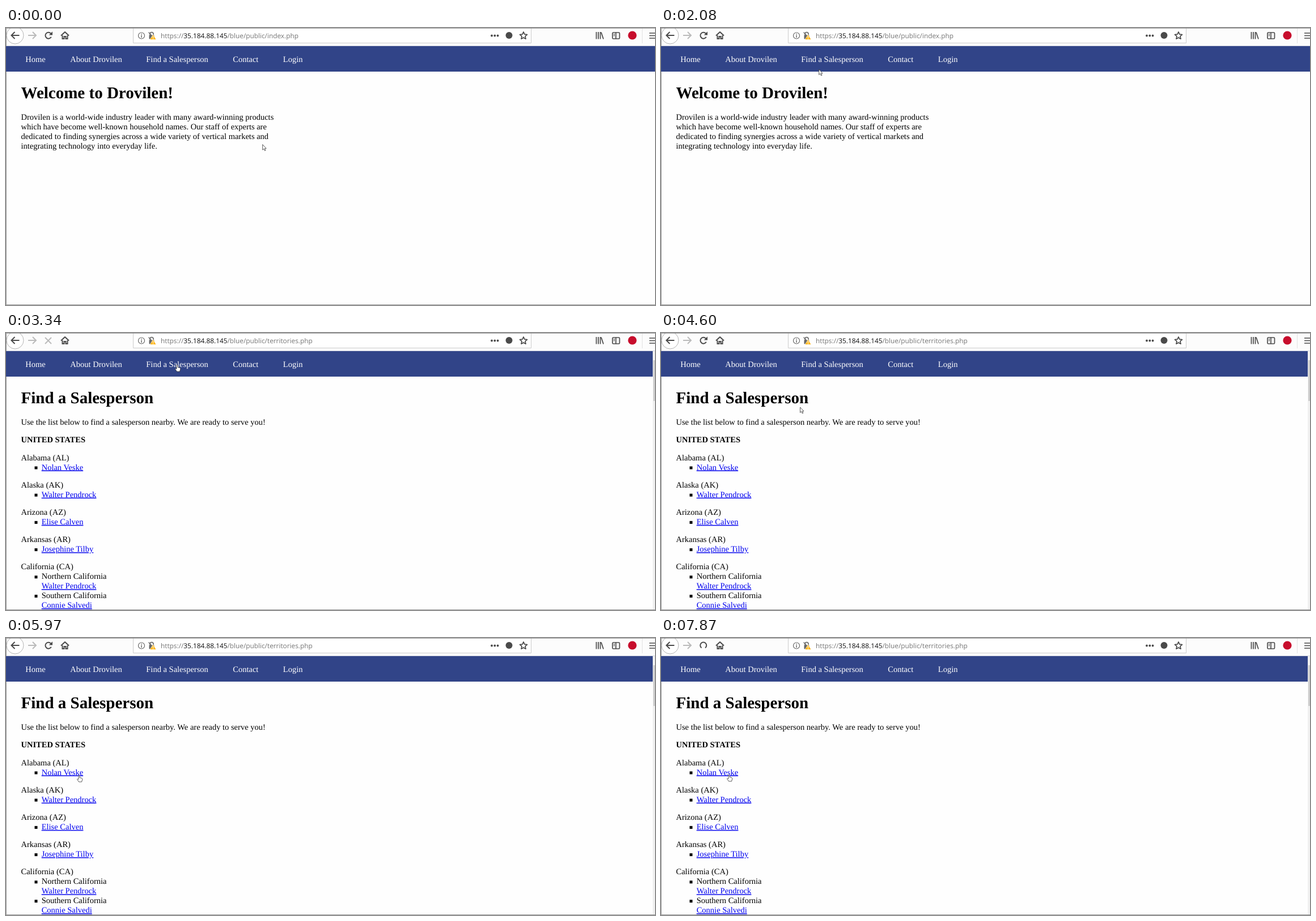
Recreate the animation shown at these times as an HTML page. Size 1145 by 489 pixels, loop 7.99 s.

```html
<!DOCTYPE html>
<html lang="en">
<head>
<meta charset="utf-8">
<title>Find a Salesperson</title>
<style>
html, body { margin: 0; height: 100%; overflow: hidden; background: #fefefe; }
svg { display: block; width: 1145px; height: 489px; }
text { font: 14.5px "Liberation Serif", "Times New Roman", serif; text-rendering: geometricPrecision; }
.h1 { font-size: 29px; font-weight: bold; }
.b { font-weight: bold; }
.link { fill: #00e; text-decoration: underline 1px; }
.nav { fill: #fff; }
.url { font: 11.83px "Open Sans", "Noto Sans", sans-serif; fill: #767676; }
.line { fill: none; stroke: #4a4a4a; stroke-width: 2; }
.thin { stroke-width: 1.7; }
.dark { fill: #4a4a4a; }
</style>
</head>
<body>
<svg viewBox="0 0 1145 489">
  <rect width="1145" height="31" fill="#fcfcfc"/>
  <path d="M0 31.5H1145" stroke="#d4d7e2"/>

  <!-- toolbar -->
  <circle cx="16" cy="13" r="15" fill="#fff" stroke="#b4b4b4"/>
  <path class="line" d="M9.5 13H23.5M15.5 7L9.5 13L15.5 19"/>
  <path class="line" style="stroke:#bbb" d="M39 13H53M47 7L53 13L47 19"/>
  <g id="stop" class="line" style="stroke:#bbb"><path d="M-5.5 -5.5L5.5 5.5M5.5 -5.5L-5.5 5.5"/></g>
  <path id="arc" class="line" pathLength="1"/>
  <path id="head" d="M82 6.2V12.6H75.8Z"/>
  <path class="line" d="M97 13.5L104 7L111 13.5" stroke-linejoin="round"/>
  <path class="line" d="M99.5 13V19H102.5V15H105.5V19H108.5V13"/>

  <!-- address field -->
  <path d="M224.5 0V26.5H926.5V0" fill="#fff" stroke="#ccc"/>
  <circle cx="239" cy="13.5" r="5.5" fill="none" stroke="#666" stroke-width="1.2"/>
  <path d="M239 10V11.4M239 12.6V17" stroke="#666" stroke-width="1.4"/>
  <path d="M254 13V10.5A3 3 0 0 1 260 10.5V13" fill="none" stroke="#666" stroke-width="1.7"/>
  <rect x="252.5" y="12.5" width="9" height="7" rx="1" fill="#666"/>
  <path d="M251.5 7.5L261 18" stroke="#666" stroke-width="1.2"/>
  <path d="M259.5 11.5L265 20.5H254Z" fill="#fdb515" stroke="#fff" stroke-width=".7"/>
  <path d="M259.5 14.5V17.5M259.5 18.3V19.5" stroke="#fff" stroke-width="1.2"/>
  <text class="url" x="273" y="18">https://<tspan fill="#0c0c0d">35.184.88.145</tspan><tspan id="path"></tspan></text>
  <g class="dark">
    <circle cx="857" cy="13.5" r="1.9"/><circle cx="862.3" cy="13.5" r="1.9"/><circle cx="867.6" cy="13.5" r="1.9"/>
    <circle cx="887.5" cy="13" r="6"/>
  </g>
  <path id="star" class="line thin" stroke-linejoin="round"/>

  <!-- right-hand buttons -->
  <path class="line thin" d="M1041.5 7V19.5M1045 7V19.5M1048.5 7V19.5M1050 7.5L1054 19.5"/>
  <rect class="line thin" x="1070" y="8" width="12.5" height="11" rx="1.5"/>
  <path class="line thin" d="M1076 8V19M1072 11H1074M1072 13.5H1074"/>
  <circle cx="1105" cy="13" r="7.6" fill="#c70d2c"/>
  <path d="M1122.5 1V27" stroke="#e2e2e2"/>
  <path class="line thin" d="M1135 9H1145M1135 13.5H1145M1135 18H1145"/>

  <!-- site -->
  <path d="M.5 0V489M0 488.5H1145M0 .5H1145" fill="none" stroke="#999"/>
  <rect id="bar" y="32" height="45" fill="#314488"/>
  <g id="nav"></g>
  <g id="home"></g>
  <g id="list"></g>
  <g id="scroll">
    <rect x="1141" y="32" width="4" height="456" fill="#f0f0f0"/>
    <rect x="1142" y="48" width="3" height="72" fill="#cdcdcd"/>
  </g>

  <!-- pointers, hot spot at 0,0 -->
  <g id="cursor" stroke="#333" stroke-width=".8" stroke-linejoin="round" fill="#fff">
    <path id="arrow" d="M0 0V9.5L2.2 7.5L3.8 11L5.3 10.3L3.8 7H6.5Z"/>
    <path id="hand" d="M-1 1Q0 -.5 1 1V4.5L5 5.5Q6 6 5.7 8L4.5 12H-.5L-3.5 7.5Q-3.3 6 -1 7.5Z"/>
    <path id="beam" fill="none" d="M-2.2 -5H-.5L0 -4.5L.5 -5H2.2M0 -4.5V4.5M-2.2 5H-.5L0 4.5L.5 5H2.2"/>
  </g>
</svg>
<script>
const $ = id => document.getElementById(id);
const LOOP = 7990, STEP = 120, LINE = 16.9, GAP = 14.4;
const text = (x, y, s, c = '') => `<text x="${x}" y="${y}" class="${c}">${s}</text>`;
const show = (id, on) => $(id).style.display = on ? '' : 'none';

$('nav').innerHTML = [[34.3, 'Home'], [113.3, 'About Drovilen'], [247.3, 'Find a Salesperson'],
  [400.3, 'Contact'], [488.8, 'Login']].map(([x, s]) => text(x, 60.2, s, 'nav')).join('');

$('home').innerHTML = text(26.5, 123.5, 'Welcome to Drovilen!', 'h1') + [
  'Drovilen is a world-wide industry leader with many award-winning products',
  'which have become well-known household names. Our staff of experts are',
  'dedicated to finding synergies across a wide variety of vertical markets and',
  'integrating technology into everyday life.'
].map((s, i) => text(26.5, 162 + i * LINE, s)).join('');

// Prefixes: "#" state heading, "*" bulleted link, "-" bulleted area, ">" link below an area
function salesList() {
  let y = 193.3, out = '';
  const rows = ['#Alabama (AL)', '*Nolan Veske', '#Alaska (AK)', '*Walter Pendrock',
    '#Arizona (AZ)', '*Elise Calven', '#Arkansas (AR)', '*Josephine Tilby',
    '#California (CA)', '-Northern California', '>Walter Pendrock',
    '-Southern California', '>Connie Salvedi'];
  for (const row of rows) {
    const kind = row[0], s = row.slice(1);
    y += LINE + (kind == '#' ? GAP : 0);
    if ('*-'.includes(kind)) out += `<rect x="50.5" y="${y - 6}" width="5" height="5"/>`;
    out += text(kind == '#' ? 26.5 : 62.7, y, s, '*>'.includes(kind) ? 'link' : '');
  }
  return out;
}
$('list').innerHTML = text(26.5, 123.5, 'Find a Salesperson', 'h1') +
  text(26.5, 162, 'Use the list below to find a salesperson nearby. We are ready to serve you!') +
  text(26.5, 193.3, 'UNITED STATES', 'b') + salesList();

$('star').setAttribute('d', 'M' + Array.from({length: 10}, (_, i) => {
  const r = i % 2 ? 3.2 : 6.8, a = i * Math.PI / 5;
  return [913 + r * Math.sin(a), 13.7 - r * Math.cos(a)].map(v => v.toFixed(1));
}).join('L') + 'Z');

// Pointer moves: start time, steps, control point, end point
const moves = [
  [500, 3, 395, 140, 334, 62],
  [990, 3, 337, 120, 336.5, 179],
  [1600, 6, 202, 90, 307, 62],
  [2450, 2, 304, 59, 302, 56],
  [4600, 1, 270, 90, 245.5, 131],
  [4720, 6, 84, 235, 115, 239],
  [5970, 1, 122, 240, 129, 242],
  [6220, 3, 162, 215, 108, 290],
  [6610, 2, 104, 325, 110, 346],
  [6850, 3, 180, 136, 122, 255],
  [7370, 1, 120, 248, 120, 241]
];

function pointer(t) {
  let x = 452.7, y = 205.7;
  for (const [start, n, cx, cy, ex, ey] of moves) {
    if (t < start) break;
    const p = Math.min(1, (Math.floor((t - start) / STEP) + 1) / n), q = 1 - p;
    x = q * q * x + 2 * p * q * cx + p * p * ex;
    y = q * q * y + 2 * p * q * cy + p * p * ey;
  }
  return [x, y];
}

function pointerKind(x, y, page) {
  for (const el of document.querySelectorAll(`#nav text, #${page} text`)) {
    const b = el.getBBox();
    if (x >= b.x && x <= b.x + b.width && y >= b.y && y <= b.y + b.height)
      return /nav|link/.test(el.getAttribute('class')) ? 'hand' : 'beam';
  }
  return 'arrow';
}

function drawReload(t) {
  const busy = t >= 3220 && t < 3340 || t >= 7870;
  const grey = t >= 3340 && t < 4070;
  const q = grey ? Math.min(1, Math.floor((t - 3340) / STEP) / 4) : 1;
  const color = grey ? '#bbb' : '#4a4a4a';
  show('stop', q < .5);
  $('stop').setAttribute('transform', `translate(74.5 13.5) scale(${Math.max(0, 1 - 2 * q)})`);
  show('arc', q > .5);
  $('arc').setAttribute('d', busy ? 'M71.5 17.5A5.5 5.5 0 1 1 78 17.5'
                                  : 'M79.8 15.8A5.5 5.5 0 1 1 79.3 9.8');
  $('arc').style.stroke = color;
  $('arc').style.strokeDasharray = `${Math.max(0, 2 * q - 1)} 2`;
  show('head', !busy && q == 1);
  $('head').style.fill = color;
}

function draw(t) {
  const page = t < 3340 ? 'home' : 'list', listed = page == 'list';
  show('home', !listed);
  show('list', listed);
  show('scroll', listed);
  $('bar').setAttribute('width', listed ? 1141 : 1145);
  $('path').textContent = `/blue/public/${listed ? 'territories' : 'index'}.php`;
  drawReload(t);
  const [x, y] = pointer(t), kind = pointerKind(x, y, page);
  for (const k of ['arrow', 'hand', 'beam']) show(k, k == kind);
  $('cursor').setAttribute('transform', `translate(${x} ${y})`);
}

function tick() {
  draw(performance.now() % LOOP);
  requestAnimationFrame(tick);
}
tick();
</script>
</body>
</html>
```
